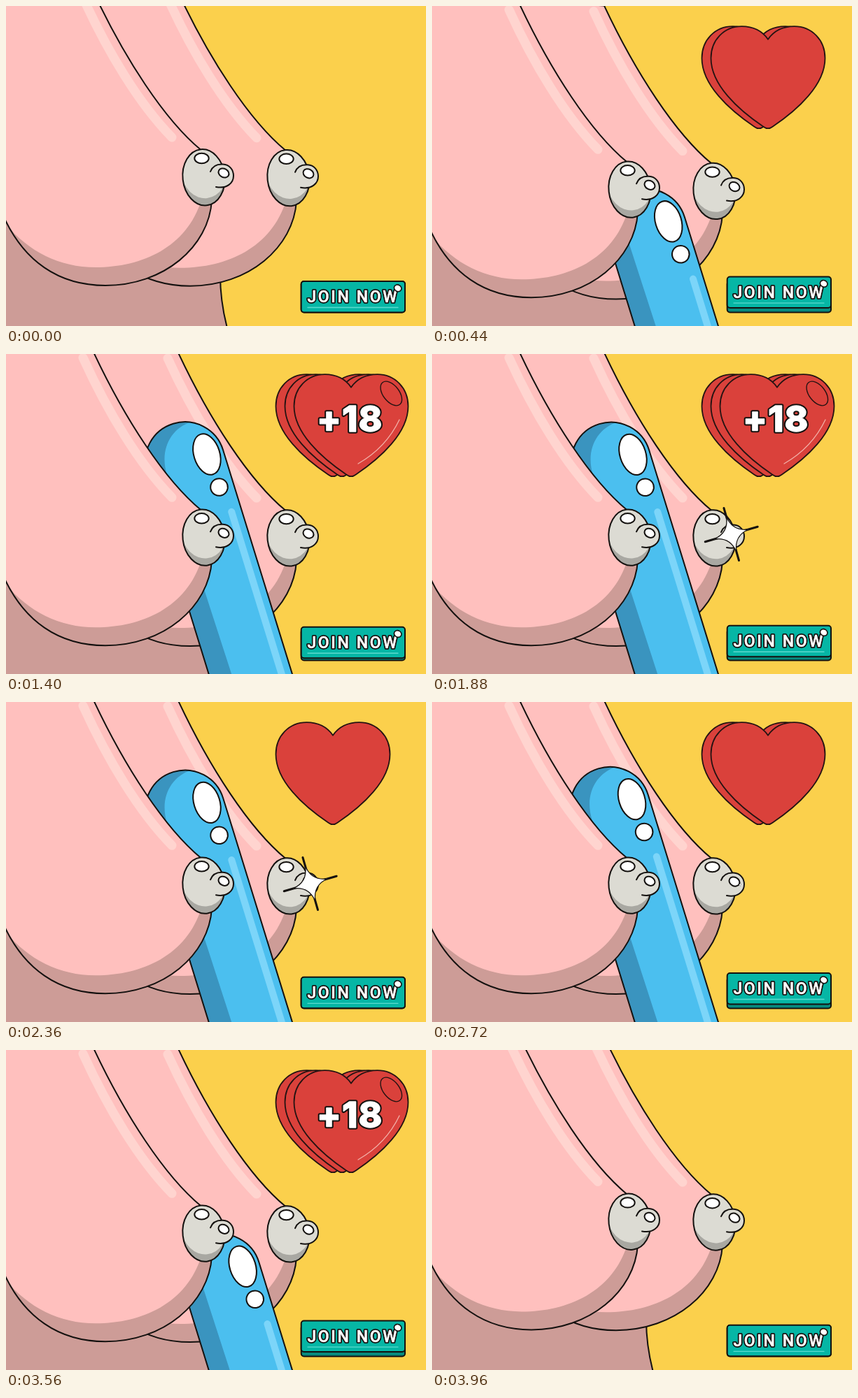
An HTML page with a canvas for the animation above (4 s loop, 600 by 458 pixels).

```html
<!DOCTYPE html>
<html lang="en">
<head>
<meta charset="utf-8">
<title>Join now</title>
<style>
html, body { margin: 0; width: 100%; height: 100%; overflow: hidden; background: #fbd04c; }
canvas { display: block; width: 600px; height: 458px; }
</style>
</head>
<body>
<canvas id="stage" width="600" height="458"></canvas>
<script>
const ctx = document.getElementById('stage').getContext('2d');
const LOOP = 4000;
const INK = '#14110f', SKIN = '#ffc0be', SHADE = '#cd9c97', SHINE = '#ffd4cf';
const PAIR = 121; // horizontal distance between the two matching shapes

// Cosine ease from 0 to 1 between a and b.
function ease(t, a, b) {
  const p = Math.min(1, Math.max(0, (t - a) / (b - a)));
  return (1 - Math.cos(Math.PI * p)) / 2;
}

// Eases in, holds, then eases out again at the mirrored time.
const swell = (t, a, b) => ease(Math.min(t, LOOP - t), a, b);

function paint(path, fill, stroke = INK, width = 2) {
  if (fill) { ctx.fillStyle = fill; ctx.fill(path); }
  if (stroke) { ctx.strokeStyle = stroke; ctx.lineWidth = width; ctx.stroke(path); }
}

function oval(x, y, rx, ry, turn = 0) {
  const p = new Path2D();
  p.ellipse(x, y, rx, ry, turn, 0, Math.PI * 2);
  return p;
}

function at(x, y, draw) {
  ctx.save();
  ctx.translate(x, y);
  draw();
  ctx.restore();
}

const torso = new Path2D('M-10 290H306V385C306 415 310 440 318 468L-10 480Z');
const breast = new Path2D('M125 -20C169.5 75 226.5 163 278.5 206L294 278C290 345 225 400 142 400C75 400 25 365 -4 300L-10 -30Z');
const underside = new Path2D('M279 278C258 345 195 374 128 374C75 374 30 350 -2 310L-20 420H310V270Z');
const streak = new Path2D('M110 -12C145 65 190 140 237 188');
const egg = oval(282.5, 245.3, 30, 40.3, -0.11);
const eggLight = oval(283, 235, 33, 40.3, -0.11);
const nub = new Path2D('M292 237C295 229 302 226 310 226.5C319 227 325 234 325 243C325 253 316 262 300 259');
const shaft = new Path2D('M-57 520V0A57 57 0 0 1 57 0V520Z');
const shaftDark = new Path2D('M-23 520L-30 12C-31 -26 -6 -52 26 -52L0 -70H-70V520Z');
const shaftStreak = new Path2D('M42.5 88V520');
const heart = new Path2D('M467.5 47C457 32 443 28.5 430 28.5C405 28.5 386 48 386 74C386 112 425 148 461 172Q467.5 177 474 172C510 148 549 112 549 74C549 48 530 28.5 505 28.5C492 28.5 478 32 467.5 47Z');
const heartGleam = new Path2D('M503 157Q543 134 562 94');
const star = new Path2D('M0 -26Q3 -3 26 0Q3 3 0 26Q-3 3 -26 0Q-3 -3 0 -26Z');
const rays = new Path2D('M0 -39V39M-39 0H39');

function drawBreast() {
  paint(breast, SKIN, null);
  ctx.save();
  ctx.clip(breast);
  paint(underside, SHADE, null);
  ctx.restore();
  paint(streak, null, SHINE, 13);
  paint(breast);
}

function drawPiercing() {
  paint(egg, '#a9a8a2', null);
  ctx.save();
  ctx.clip(egg);
  paint(eggLight, '#dcdbd3', null);
  ctx.restore();
  paint(egg);
  paint(nub, '#dcdbd3');
  paint(oval(279.5, 218, 10.2, 7.2), '#fff');
  paint(oval(311, 239, 7.8, 6.2, 0.5), '#fff');
}

function drawShaft(t) {
  const slide = 410 * (1 - swell(t, 0, 840)) + 16.8 * swell(t, 1000, 1440);
  at(250.8, 138.5, () => {
    ctx.rotate(-0.299);
    ctx.translate(0, slide);
    paint(shaft, '#4bbfef', null);
    ctx.save();
    ctx.clip(shaft);
    paint(shaftDark, '#3a94bf', null);
    ctx.restore();
    paint(shaftStreak, null, '#7cd5f9', 10);
    paint(shaft);
    paint(oval(33, -1, 18.5, 30), '#fff');
    paint(oval(36, 49, 12.3, 12.3), '#fff');
  });
}

function drawBody(t) {
  const drop = 17.3 * swell(t, 0, 400);
  // The far side swings a little further, then settles.
  const sway = 0.8 + 1.5 * ease(t, 0, 440) * (1 - ease(t, 440, 1400));
  at(0, drop, () => {
    paint(torso, SHADE);
    at(PAIR, sway, () => { drawBreast(); drawPiercing(); });
  });
  drawShaft(t);
  at(0, drop, () => { drawBreast(); drawPiercing(); });
}

function drawSparkle(t) {
  const size = ease(t, 1480, 1720) * (1 - ease(t, 2520, 2760));
  if (size < 0.01) return;
  const drift = (t - 1880) / 480;
  at(427.7 + 7 * drift, 258 + 2 * drift, () => {
    ctx.rotate(-0.28);
    ctx.scale(size, size);
    paint(rays, null, INK, 3);
    paint(star, '#fff', INK, 1.2);
  });
}

function label(text, x, y, font, spacing, outline, bold) {
  ctx.font = font;
  ctx.letterSpacing = spacing + 'px';
  ctx.textAlign = 'left';
  ctx.textBaseline = 'alphabetic';
  ctx.strokeStyle = INK;
  ctx.lineWidth = outline;
  ctx.strokeText(text, x, y);
  ctx.fillStyle = '#fff';
  ctx.fillText(text, x, y);
  if (bold) {
    ctx.strokeStyle = '#fff';
    ctx.lineWidth = bold;
    ctx.strokeText(text, x, y);
  }
}

function drawHearts(t) {
  const beat = t % 2000;
  const count = beat >= 1920 ? 0 : [200, 400, 1000].filter(s => beat >= s).length;
  for (let i = 0; i < count; i++) {
    at(13 * i - 0.5, 0.7, () => paint(heart, '#da413b', '#241312', 1.8));
  }
  if (count < 3) return;
  paint(oval(550.3, 56.5, 11.5, 20, -0.66), null, '#241312', 1.4);
  paint(heartGleam, null, '#f2b0a8', 1.3);
  label('+18', 444, 111, '800 51px Inter, Roboto, sans-serif', 1, 5.5, 1.4);
}

function drawButton(t) {
  const lift = 6.6 * (1 - Math.cos(2 * Math.PI * t / 800)) / 2;
  const box = y => {
    const p = new Path2D();
    p.roundRect(421.7, y, 148.3, 44.5, 4);
    return p;
  };
  paint(box(394), '#078a7e');
  at(0, -lift, () => {
    paint(box(394), '#06b6a5');
    paint(new Path2D('M431 431.5H560'), null, '#5cd9cd', 1.3);
    label('JOIN NOW', 430.5, 424, '500 23px Roboto, Arial, sans-serif', 2.6, 4, 0.5);
    paint(oval(559.7, 403.8, 5.4, 4.7, 0.5), '#fff', INK, 1.6);
  });
}

function frame(now) {
  const t = now % LOOP;
  ctx.lineCap = ctx.lineJoin = 'round';
  ctx.fillStyle = '#fbd04c';
  ctx.fillRect(0, 0, 600, 458);
  drawBody(t);
  drawSparkle(t);
  drawHearts(t);
  drawButton(t);
}

const start = performance.now();
function tick() {
  frame(performance.now() - start);
  requestAnimationFrame(tick);
}
tick();
</script>
</body>
</html>
```
